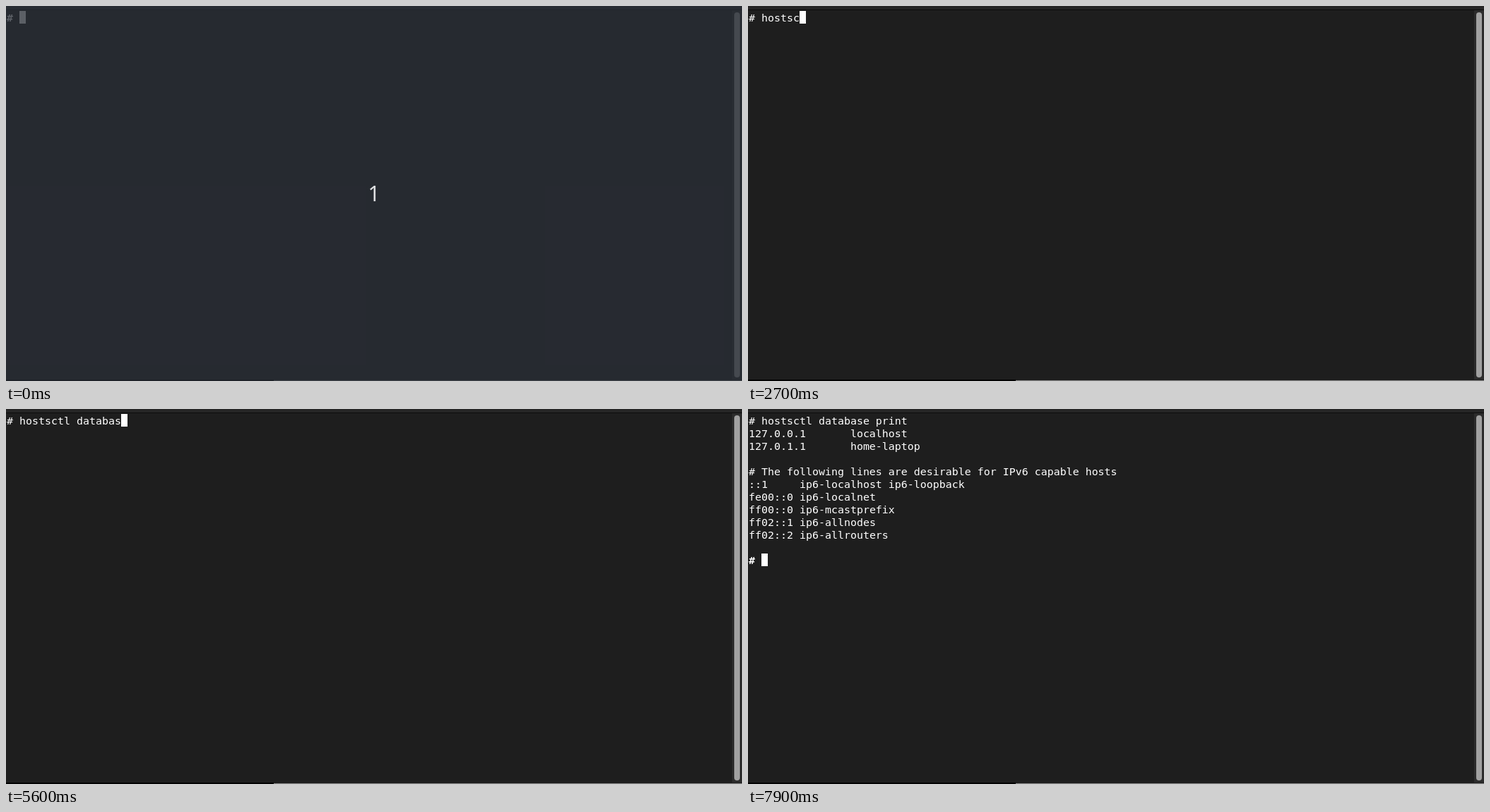
Write an HTML page that moves like this. It is 1042 px wide and 532 px high and loops after 8 s.

```html
<!DOCTYPE html>
<html lang="en">
<head>
<meta charset="utf-8">
<title>Terminal</title>
<style>
  html, body { margin: 0; width: 100%; height: 100%; overflow: hidden; background: #1e1e1e; }
  #stage { position: relative; width: 1042px; height: 532px; overflow: hidden; background: #1e1e1e; }
  #stage > * { position: absolute; box-sizing: border-box; }
  #bar { left: 0; top: 0; width: 1042px; height: 6px; background: #262626; border-bottom: 1px solid #0c0c0c; }
  #trough { left: 1028px; top: 6px; width: 14px; height: 524px; background: #2c2c2c; }
  #thumb { left: 1031px; top: 9px; width: 8px; height: 518px; border-radius: 4px; background: #a1a1a1; }
  #edge { left: 0; top: 530px; width: 379px; height: 2px; background: #000; }
  #rim { left: 379px; top: 531px; width: 663px; height: 1px; background: #8c8c8c; }
  #text {
    left: 1px; top: 8px; margin: 0; color: #fff; white-space: pre; tab-size: 8;
    font: 14.95px/18px "DejaVu Sans Mono", "Noto Sans Mono", monospace;
    font-variant-ligatures: none;
  }
  #cursor { width: 9px; height: 18px; background: #fff; }
  #shade {
    inset: 0; background: rgba(42, 46, 55, .76); color: #dfe0e2; text-align: center;
    font: 30px/532px "Noto Sans", "Open Sans", sans-serif;
  }
</style>
</head>
<body>
<div id="stage">
  <div id="bar"></div>
  <div id="trough"></div>
  <div id="thumb"></div>
  <div id="edge"></div>
  <div id="rim"></div>
  <pre id="text"></pre>
  <div id="cursor"></div>
  <div id="shade">1</div>
</div>
<script>
const LOOP = 8000, SHADE_END = 100, BOLD_END = 200, RUN = 7900;
const CELL_W = 9, CELL_H = 18, LEFT = 1, TOP = 7;
const COMMAND = "hostsctl database print";

// Time at which each character of the command appears
const KEYS = [
  800, 1100, 1400, 2000, 2200, 2700, 3000, 3300, 3500,
  4100, 4400, 4800, 5000, 5100, 5300, 5600, 6100, 6500,
  6800, 7000, 7100, 7400, 7600
];

const OUTPUT = [
  "127.0.0.1\tlocalhost",
  "127.0.1.1\thome-laptop",
  "",
  "# The following lines are desirable for IPv6 capable hosts",
  "::1\tip6-localhost ip6-loopback",
  "fe00::0\tip6-localnet",
  "ff00::0\tip6-mcastprefix",
  "ff02::1\tip6-allnodes",
  "ff02::2\tip6-allrouters",
  ""
];

const [text, cursor, shade] = ["text", "cursor", "shade"].map(id => document.getElementById(id));
const prompt = bold => (bold ? "<b>#</b> " : "# ");
let shown = null;

function render(time) {
  const done = time >= RUN;
  const typed = COMMAND.slice(0, KEYS.filter(key => key <= time).length);
  const lines = [prompt(time < BOLD_END) + typed];
  if (done) lines.push(...OUTPUT, prompt(true));

  const html = lines.join("\n");
  if (html !== shown) text.innerHTML = shown = html;

  const col = 2 + (done ? 0 : typed.length);
  cursor.style.left = LEFT + col * CELL_W + "px";
  cursor.style.top = TOP + (lines.length - 1) * CELL_H + "px";
  shade.style.display = time < SHADE_END ? "block" : "none";
}

const start = performance.now();
function tick() {
  render((performance.now() - start) % LOOP);
  requestAnimationFrame(tick);
}
tick();
</script>
</body>
</html>
```
